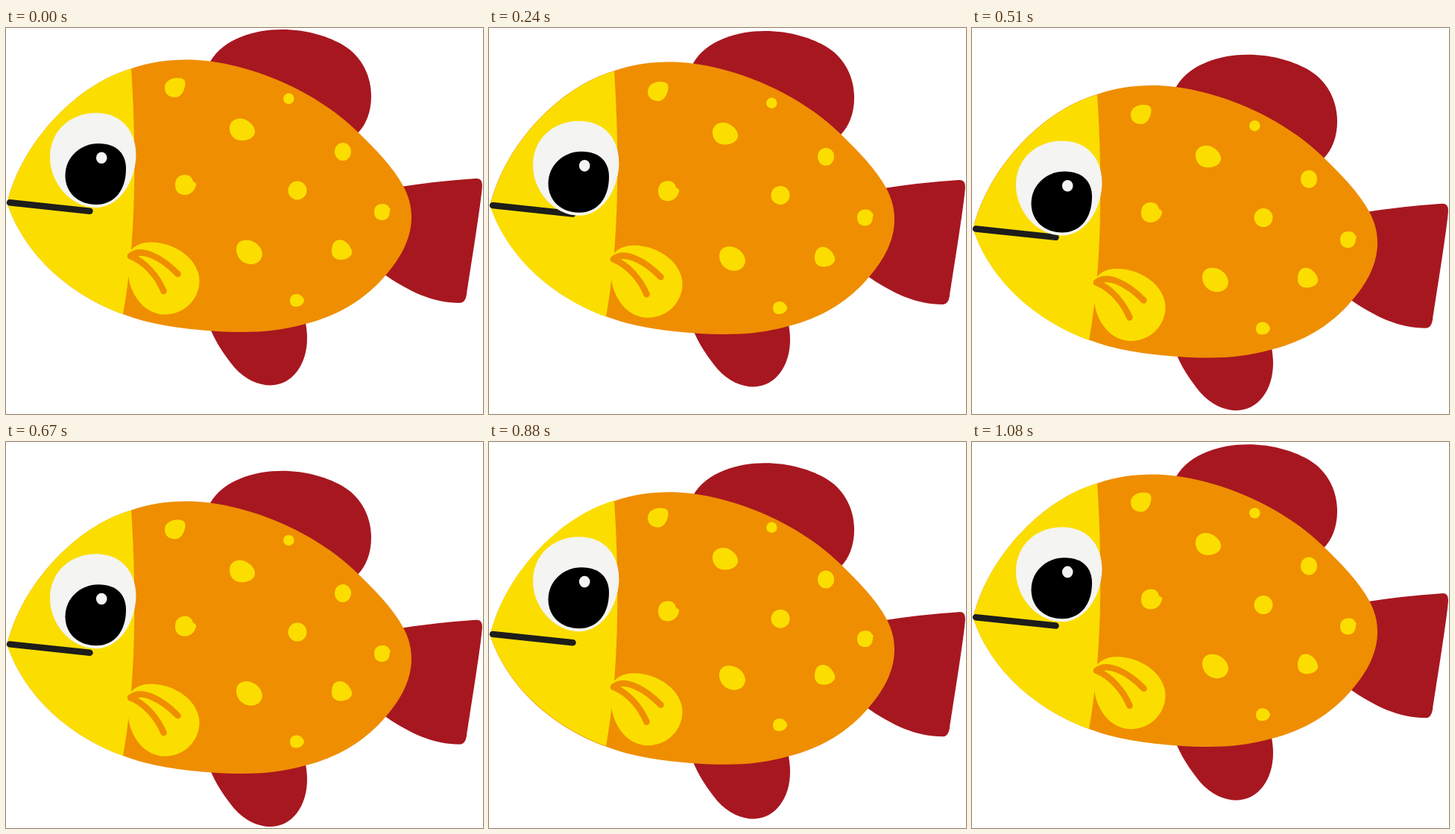
An HTML page with a canvas for the animation above (1110 ms loop, 640 by 518 pixels).

```html
<!DOCTYPE html>
<html lang="en">
<head>
<meta charset="utf-8">
<title>Bobbing fish</title>
<style>
html, body { margin: 0; width: 100%; height: 100%; overflow: hidden; background: #fff; }
canvas { display: block; }
</style>
</head>
<body>
<canvas id="stage" width="640" height="518"></canvas>
<script>
const ctx = document.getElementById('stage').getContext('2d');
const RED = '#a71720', ORANGE = '#ef8e00', YELLOW = '#fbde00', INK = '#1d1d1b';
const LOOP = 1110, STEPS = 33, HALF = STEPS / 2, DEPTH = 38, PULL = 0.62;

const parts = [];
const fill = (lag, color, d) => parts.push({ lag, color, path: new Path2D(d) });
const line = (lag, color, width, d) => parts.push({ lag, color, width, path: new Path2D(d) });
function dot(lag, color, x, y, rx, ry = rx) {
  const path = new Path2D();
  path.ellipse(x, y, rx, ry, 0, 0, Math.PI * 2);
  parts.push({ lag, color, path });
}

// Fins and tail
fill(2.75, RED, 'M274 45C292 14 334 2 370 2C403 2 433 11 454 24C478 39 490 65 490 92C490 112 483 130 472 141L400 200L300 150Z');
fill(2.75, RED, 'M520 214.5Q580 205 630 202Q639 201 639 211C638 232 624 318 618 358Q616 369 609 369C573 369 541 354 505 329Z');
fill(2.75, RED, 'M272 398C280 421 294 440 306 455C321 472 339 479.5 355 479.5C384 479 404 452 404 416Q404 405 401 390L300 380Z');

// Body and face
const snout = 'C90 360 26 308 1.5 235C20 157 91 77 168 54.5';
fill(2.4, ORANGE, 'M157 384' + snout + 'C192 46 217 42.5 242 42.5C316 42.5 413 81 472 139.5C494 161 519 186 533 212C541 227 544 240 544 254C544 282 530 308 510 331C482 365 443 387 402 397C374 405 346 408 318 408C303 408 290 407.5 276 406.5C236 404 190 397 157 384Z');
fill(2.25, YELLOW, 'M157 384' + snout + 'C175.5 170 174 290 157 384Z');
line(2.15, INK, 8.5, 'M5 234.3L112.5 245.7');

// Side fin
fill(1.97, YELLOW, 'M163 306C168 293 180 287.5 195 287.5C228 288 259 311 259.5 339C259.5 365 238 384.5 213 384.5C186 384.5 166 358 164 330Z');
line(1.97, ORANGE, 8.5, 'M167 306C181 294 208 307 230.5 330');
line(1.97, ORANGE, 8.5, 'M167 306C187 314 203 333 211.5 353');

// Spots
fill(1.75, YELLOW, 'M213 80C213 71 222 67 230 67C238 67 241 70 240.5 76C239 86 234 93 227 93C218 93 213 88 213 80');
fill(1.55, YELLOW, 'M300 136C299 126 307 121 315 121.5C325 122 335 132 334 140C333 147 325 151 317 151C307 151 301 145 300 136');
dot(1.45, YELLOW, 379.3, 94.8, 7.2);
dot(1.2, YELLOW, 452, 166, 11, 12);
dot(1.32, YELLOW, 391, 218, 12.5);
fill(1, YELLOW, 'M494 247C494 240 498 236 505 236C510 236 513 238 514 241Q517 243 515 245C515 253 511 258 505 258C498 258 494 254 494 247');
fill(0.85, YELLOW, 'M227 211C227 202 232 197 240 197C247 197 250 201 251 206Q256 208 255 211C253 219 247 224 240 224C232 224 227 219 227 211');
fill(0.7, YELLOW, 'M309 297C309 288 316 284 323 284.5C335 285 344 295 344 304C343 312 337 317 329 317C318 317 309 308 309 297');
fill(0.52, YELLOW, 'M440 288C445 282 453 284 458 289C462 293 465 299 464 303C461 309 455 311 448 311C440 310 437 306 437 299Q437 292 440 288');
fill(0.42, YELLOW, 'M381 366C381 360 385 357 390 357C395 357 400 362 400 366C399 371 394 374 389 374C384 374 381 371 381 366');

// Eye
fill(0.27, '#f4f4f2', 'M59 172C60 137 87 114 121 114C156 114 175 139 174.5 172C173 209 150 241 121 241C86 241 58 206 59 172');
fill(0.27, '#000', 'M79.5 198C79.5 173 100 155 124 155C150 155 161 170 161 189C161 218 145 237 121 237C97 237 79.5 221 79.5 198');
dot(0.27, '#f4f4f2', 128.2, 174.2, 7.3, 7.8);

// Symmetric ease-in-out: cubic-bezier(PULL, 0, 1 - PULL, 1)
function ease(x) {
  let lo = 0, hi = 1;
  for (let i = 0; i < 24; i++) {
    const t = (lo + hi) / 2, u = 1 - t;
    const bx = 3 * u * u * t * PULL + 3 * u * t * t * (1 - PULL) + t * t * t;
    if (bx < x) lo = t; else hi = t;
  }
  return lo * lo * (3 - 2 * lo);
}

function sink(step) {
  const p = (step + STEPS) % STEPS;
  return DEPTH * (p < HALF ? ease(p / HALF) : 1 - ease((p - HALF) / HALF));
}

function draw(ms) {
  // The motion advances in whole steps, about 30 a second.
  const step = Math.floor(((ms % LOOP) + 4) / LOOP * STEPS) % STEPS;
  ctx.fillStyle = '#fff';
  ctx.fillRect(0, 0, 640, 518);
  ctx.lineCap = 'round';
  for (const { lag, color, width, path } of parts) {
    ctx.save();
    ctx.translate(0, sink(step - lag) - sink(-lag));
    if (width) {
      ctx.lineWidth = width;
      ctx.strokeStyle = color;
      ctx.stroke(path);
    } else {
      ctx.fillStyle = color;
      ctx.fill(path);
    }
    ctx.restore();
  }
}

const start = performance.now();
function tick() {
  draw(performance.now() - start);
  requestAnimationFrame(tick);
}
tick();
</script>
</body>
</html>
```
